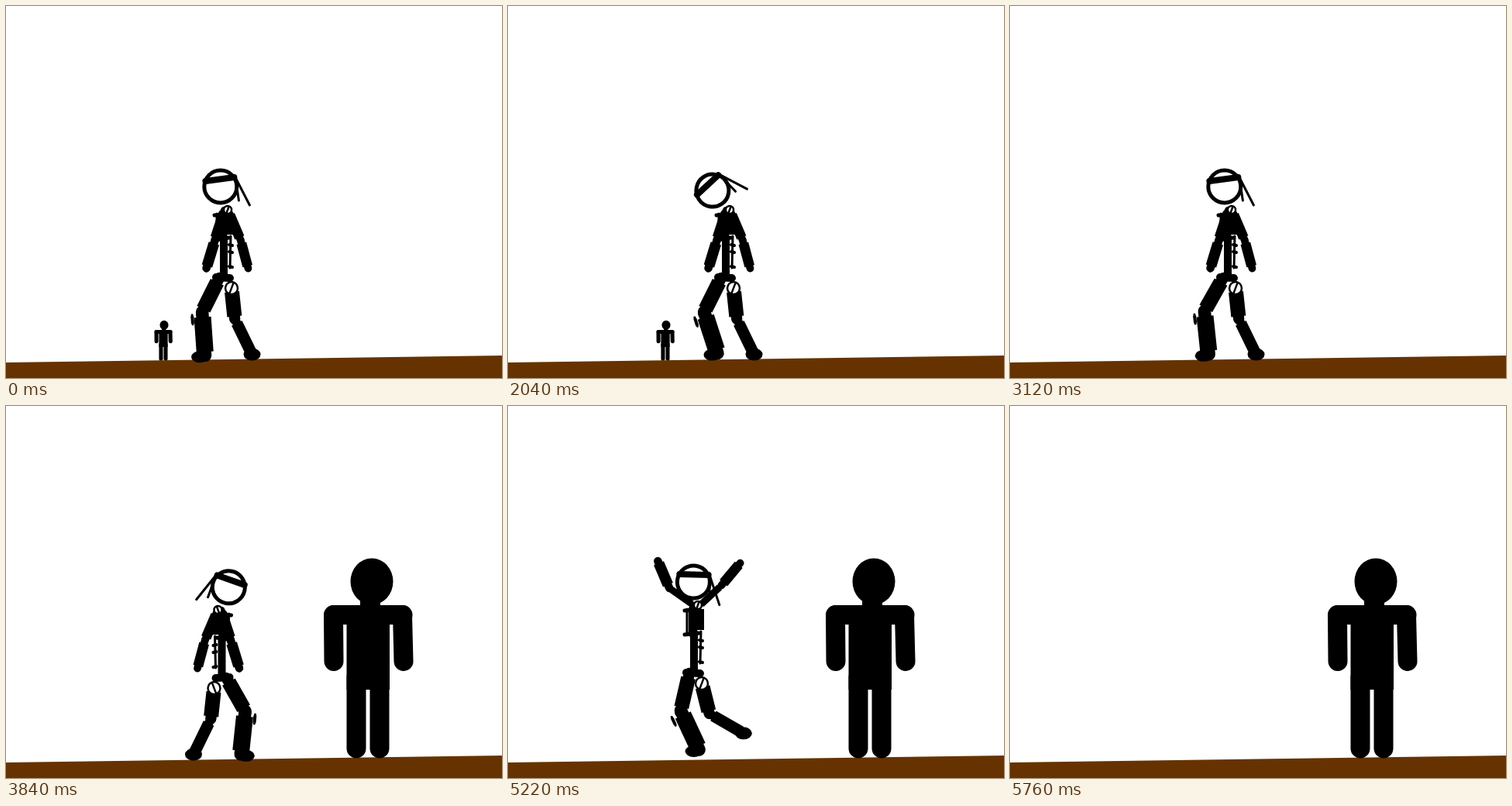
Recreate the animation shown at these times as an HTML page with a canvas. Size 640x480 px, loop 5.94 s.

```html
<!DOCTYPE html>
<html lang="en">
<head>
<meta charset="utf-8">
<style>
  html, body { margin: 0; width: 100%; height: 100%; overflow: hidden; background: #fff; }
  canvas { display: block; }
</style>
</head>
<body>
<canvas id="stage" width="640" height="480"></canvas>
<script>
const ctx = document.getElementById('stage').getContext('2d');
const LOOP = 5940, STEP = 60, RAD = Math.PI / 180;
const KICK = 2400, TURN = 3720, FLEE = 5040, GONE = 5760;

const mix = (a, b, k) => a + (b - a) * k;
const ramp = (t, t0, t1) => Math.min(1, Math.max(0, (t - t0) / (t1 - t0)));

function line(width, x0, y0, x1, y1, cap = 'round') {
  ctx.lineWidth = width;
  ctx.lineCap = cap;
  ctx.beginPath();
  ctx.moveTo(x0, y0);
  ctx.lineTo(x1, y1);
  ctx.stroke();
}

function oval(x, y, rx, ry = rx) {
  ctx.beginPath();
  ctx.ellipse(x, y, rx, ry, 0, 0, 2 * Math.PI);
  ctx.fill();
}

function ring(x, y, r, width) {
  ctx.fillStyle = '#fff';
  oval(x, y, r);
  ctx.lineWidth = width;
  ctx.stroke();
  ctx.fillStyle = '#000';
}

// A hinge with a slanted slot
function joint(x, y, r) {
  ring(x, y, r, 2.5);
  line(2.5, x + r * .3, y - r * .8, x - r * .3, y + r * .8);
}

function group(draw) {
  ctx.save();
  draw();
  ctx.restore();
}

// Blocky limb segment; angle is clockwise from straight down, returns its far end
function bone([x, y], angle, length, width) {
  const dx = -Math.sin(angle * RAD) * length, dy = Math.cos(angle * RAD) * length;
  line(width * .75, x, y, x + dx, y + dy);
  line(width, x + dx * .12, y + dy * .12, x + dx * .92, y + dy * .92, 'butt');
  return [x + dx, y + dy];
}

// Solid figure placed by its hips, symmetric about x = 0
function man(x, y, scale, angle) {
  group(() => {
    ctx.translate(x, y);
    ctx.rotate(angle * RAD);
    ctx.scale(scale, scale);
    oval(5, -139.5, 27.5, 30);
    ctx.fillRect(-10, -121, 26, 15);
    ctx.fillRect(-27.5, -106, 55.5, 106);
    line(25, -44, -96.5, 45, -96.5);
    for (const side of [-1, 1]) {
      line(25, side * 44.5, -96.5, side * 45 + 1, -36.5);
      line(25, side * 15, -16, side * 15, 76);
    }
  });
}

function head(angle) {
  group(() => {
    ctx.translate(278.4, 256);
    ctx.rotate(angle * RAD);
    ring(-1.6, -23, 21, 5);
    line(8, -21, -30, 16, -35);
    line(3, 18, -34, 36, 1);
    line(3, 18, -32, 22, -5);
  });
}

function frontLeg(thigh, calf) {
  const knee = bone([275, 351], thigh, 49, 19);
  const [x, y] = knee;
  oval(x, y + 2, 8);
  const [ax, ay] = bone(knee, calf, 56, 22);
  oval(ax - 7, ay + 2, 11, 7.5);
  bone([x - 13 * Math.cos(calf * RAD), y + 3 - 13 * Math.sin(calf * RAD)], calf, 12, 4);
}

function backLeg(thigh, calf) {
  const knee = bone([291, 364], thigh, 40, 19);
  const [ax, ay] = bone(knee, calf, 51, 15);
  oval(ax, ay, 11, 8);
  joint(291, 364, 8);
}

function arm(shoulder, upper, fore, width, raised) {
  const elbow = bone(shoulder, upper, 40, mix(width, 9, raised));
  bone(elbow, fore, 38, width);
}

function torso() {
  line(10, 281, 298, 281, 346);
  line(10, 271, 350, 289, 351);
  line(3, 290, 297, 289, 338);
  for (const y of [308, 317, 336]) line(4, 288, y, 292, y + 1);
  for (const x of [272, 279]) line(x - 269, x, 268, x, 300);
  for (const y of [269, 300]) line(5, 269, y + 1, 288, y - 1);
  ctx.fillRect(279, 268, 15, 27);
}

function fighter(t) {
  const run = ramp(t, FLEE - 60, FLEE + 120);
  const phase = (t - 5220) / 360 * 2 * Math.PI;
  const swing = Math.sin(phase);
  const windUp = ramp(t, 1980, 2220), strike = ramp(t, 2220, KICK), settle = ramp(t, 2700, 3120);

  const nod = -35 * (ramp(t, 1080, 1380) - settle + ramp(t, TURN, 4080)) + 44 * ramp(t, 4140, 4440);
  const thigh = 26.5 - 8 * strike + 11 * settle;
  const calf = -4 - 56 * windUp + 80 * strike - 26 * settle;

  group(() => {
    if (t >= FLEE) {
      ctx.translate(1 - .483 * Math.max(0, t - 5133), -3 - 3 * Math.cos(phase));
    } else if (t >= TURN) {
      ctx.translate(559.5, 0);
      ctx.scale(-1, 1);
    }
    backLeg(-6 + run * (30 * swing - 8), -26 + run * (10 * swing - 34));
    frontLeg(mix(thigh, 13 - 30 * swing, run), mix(calf, -25 - 15 * swing, run));
    torso();
    arm([282, 264], mix(18, 125, run), mix(17, 157, run), 14, run);
    arm([287, 265], mix(-23, -133, run), mix(-15, -140, run), 13, run);
    joint(286, 263, 5);
    head(nod);
  });
}

function ground() {
  ctx.fillStyle = '#630';
  ctx.beginPath();
  ctx.moveTo(0, 460);
  ctx.lineTo(640, 451);
  ctx.lineTo(640, 480);
  ctx.lineTo(0, 480);
  ctx.fill();
  ctx.fillStyle = '#000';
}

function draw(t) {
  ctx.fillStyle = '#fff';
  ctx.fillRect(0, 0, 640, 480);
  ctx.fillStyle = ctx.strokeStyle = '#000';
  if (t < 2760) {
    const k = ramp(t, KICK - 60, 2640);
    man(mix(203, 4, k), mix(440, 455, k) - 25 * Math.sin(k * Math.PI), .202, -163 * k);
  }
  ground();
  if (t >= TURN) man(467, 366, 1, 0);
  if (t < GONE) fighter(t);
}

function tick() {
  draw(Math.floor(performance.now() % LOOP / STEP) * STEP);
  requestAnimationFrame(tick);
}
tick();
</script>
</body>
</html>
```
